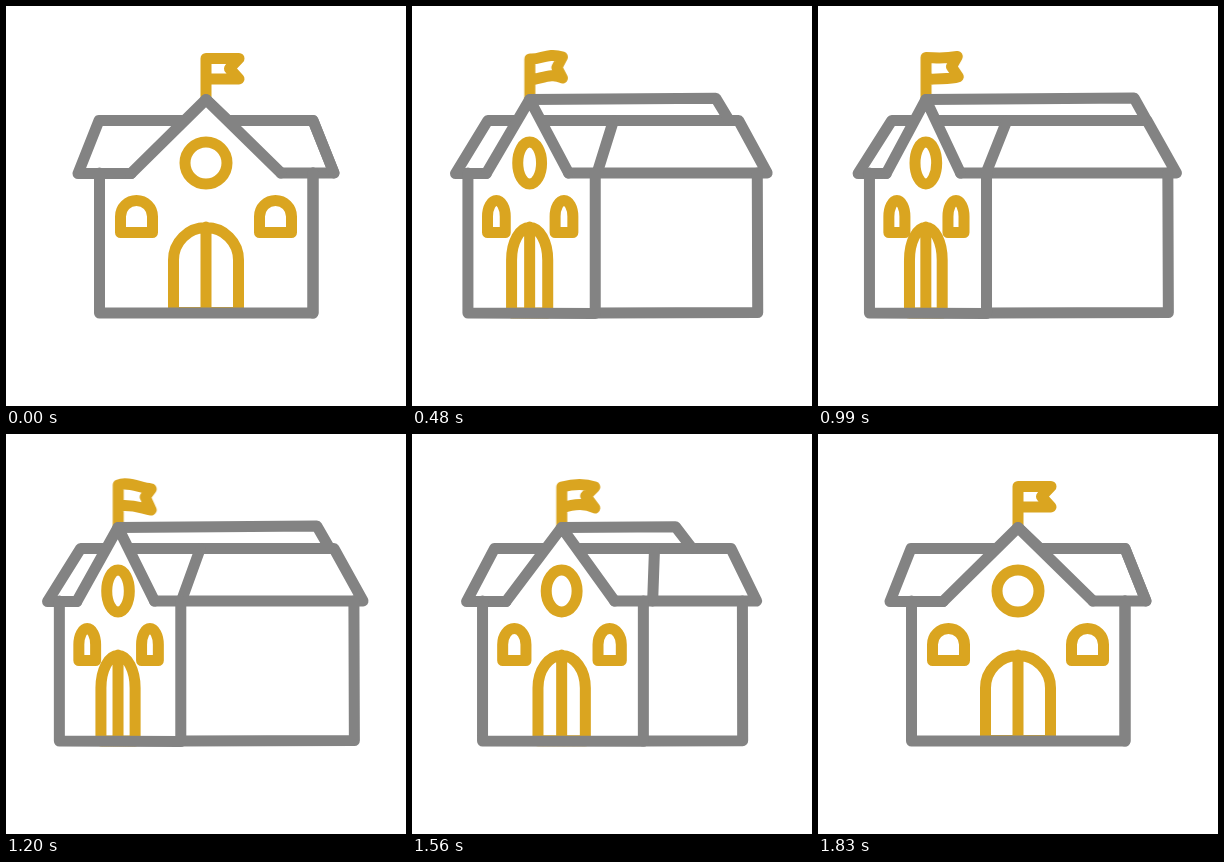
Recreate the animation shown at these times as an HTML page without scripts. Size 400x400 px, loop 1860 ms.

```html
<!DOCTYPE html>
<html lang="en">
<head>
<meta charset="utf-8">
<title>Turning schoolhouse</title>
<style>
html, body { margin: 0; width: 100%; height: 100%; overflow: hidden; background: #fff; }
svg { display: block; width: 100%; height: 100%; }
path { fill: none; stroke-width: 11; stroke-linecap: round; stroke-linejoin: round; }
.gray { stroke: #838383; }
.gold { stroke: #daa520; }
#gable { fill: #fff; }

/* Short rest, then a turn; played back and forth */
path, #pole { animation: .93s cubic-bezier(.333, 0, 0, 1) -.03s infinite alternate; }
#roof { animation-name: roof; }
#ridge { animation-name: ridge; }
#hip { animation-name: hip; }
#gable { animation-name: gable; }
#front { animation-name: front; }
#side { animation-name: side; }
#door { animation-name: door; }
#round { animation-name: round; }
#left { animation-name: left; }
#right { animation-name: right; }
#pole { animation-name: pole; }
#flag { animation-name: flag; animation-timing-function: linear; }

@keyframes roof {
  0%, 3.226% { d: path("M125 167.5L72 167.5L93 114.5L307 114.5L328 167L275 167"); }
  to { d: path("M68 167.5L40 167.5L73.7 114.5L329 114.5L358.5 167L142 167"); }
}
@keyframes ridge {
  0%, 3.226% { d: path("M200 93.5L200 93.5L222 114.5"); }
  to { d: path("M107.5 93.5L316.5 92L329 114.5"); }
}
@keyframes hip {
  0%, 3.226% { d: path("M307 114.5L328 167"); }
  to { d: path("M188.5 114.5L167.5 167"); }
}
@keyframes gable {
  0%, 3.226% { d: path("M125 167.5L200 93.5L275 167"); }
  to { d: path("M68 167.5L107.5 93.5L142 167"); }
}
@keyframes front {
  0%, 3.226% { d: path("M93.5 167L93.5 307L307 307L307 167"); }
  to { d: path("M51.3 167L51.3 307L168 307.5L168 167"); }
}
@keyframes side {
  0%, 3.226% { d: path("M307 167L307 307L307 307"); }
  to { d: path("M350 167L350.5 306.5L168 307"); }
}
@keyframes door {
  0%, 3.226% { d: path("M167.5 306.5V254a32.5 32.5 0 0 1 65 0V306.5zM200 221V306.5"); }
  to { d: path("M91.2 307V254a16.3 32.5 0 0 1 32.6 0V307zM107.5 221V307"); }
}
@keyframes round {
  0%, 3.226% { d: path("M179 157a21 21 0 0 1 42 0a21 21 0 0 1 -42 0z"); }
  to { d: path("M96.7 157a10.8 21 0 0 1 21.6 0a10.8 21 0 0 1 -21.6 0z"); }
}
@keyframes left {
  0%, 3.226% { d: path("M114.5 226.5V210.5a16 16 0 0 1 32 0V226.5z"); }
  to { d: path("M70.7 226.5V210.5a8 16 0 0 1 16 0V226.5z"); }
}
@keyframes right {
  0%, 3.226% { d: path("M253.5 226.5V210.5a16 16 0 0 1 32 0V226.5z"); }
  to { d: path("M129.5 226.5V210.5a8 16 0 0 1 16 0V226.5z"); }
}
@keyframes pole {
  0%, 3.226% { transform: translateX(0); }
  to { transform: translateX(-92.3px); }
}
@keyframes flag {
  0%, 3.226% { d: path("M200 93V52.5C211 52.5 222 52.5 233 52.5L223.5 62.5L233 73C222 73 211 73 200 73"); }
  29.03% { d: path("M200 93V53C211 50 222 49 233 53L224 62L233 74C222 68 211 70 200 74"); }
  54.84% { d: path("M200 93V53C211 54 218 46 232.5 51L227 61.5L232.5 72C222 66 211 73 200 74"); }
  67.74% { d: path("M200 93V51C209 47 222 54 233 55L227 63L233 76C222 74 214 70 200 72"); }
  80.65% { d: path("M200 93V50C207 49 213 60 230 50L224 60L232 69.5C222 82 214 70 200 74"); }
  to { d: path("M200 93V53C211 54 218 46 232.5 51L227 61.5L232.5 72C222 66 211 73 200 74"); }
}
</style>
</head>
<body>
<svg viewBox="0 0 400 400">
  <g id="pole"><path id="flag" class="gold"/></g>
  <g class="gray">
    <path id="roof"/>
    <path id="ridge"/>
    <path id="hip"/>
    <path id="gable"/>
  </g>
  <path id="door" class="gold"/>
  <g class="gray">
    <path id="side"/>
    <path id="front"/>
  </g>
  <g class="gold">
    <path id="round"/>
    <path id="left"/>
    <path id="right"/>
  </g>
</svg>
</body>
</html>
```
